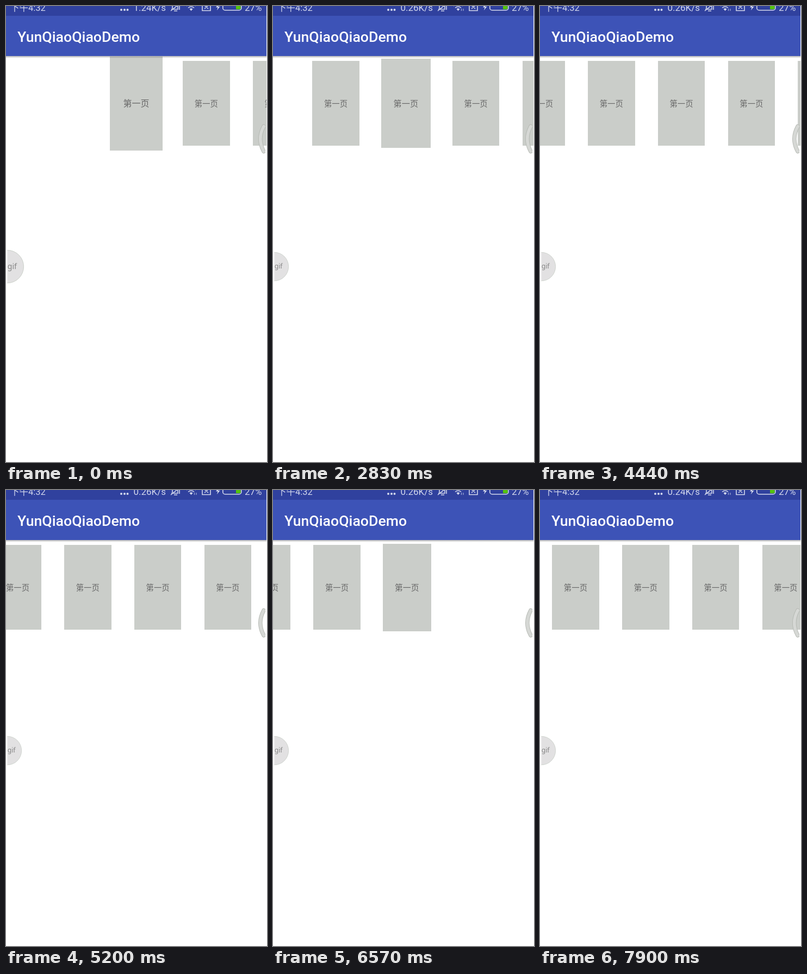
Animation of 480 by 839 pixels, one loop 8000 ms. Source, as an HTML page:

```html
<!DOCTYPE html>
<html lang="zh-CN">
<head>
<meta charset="utf-8">
<title>Pager demo</title>
<style>
  html, body { margin: 0; width: 100%; height: 100%; overflow: hidden; background: #fff; }
  svg { display: block; width: 100%; height: 100%; }
  text { font-family: Roboto, "Noto Sans CJK SC", "Noto Sans CJK", sans-serif; }
  .title { font-size: 26.67px; font-weight: 500; fill: #fff; }
  .status { font-size: 17px; fill: #d3d8ec; }
  .icon { fill: none; stroke: #d3d8ec; stroke-width: 1.6; }
  .card rect { fill: #cacdc9; shape-rendering: crispEdges; }
  .card text { font-size: 16px; fill: #686868; text-anchor: middle; }
  .handle { fill: none; stroke-linecap: round; }
  .bubble-label { font-family: "Noto Sans", sans-serif; font-size: 14px; fill: #858585; }
</style>
</head>
<body>
<svg viewBox="0 0 480 839">
  <defs>
    <linearGradient id="shade" x2="0" y2="1">
      <stop stop-color="#000" stop-opacity=".3"/>
      <stop offset="1" stop-color="#000" stop-opacity="0"/>
    </linearGradient>
    <clipPath id="edge"><rect x="460" y="210" width="17" height="70"/></clipPath>
    <clipPath id="screen"><rect width="479" height="839"/></clipPath>
  </defs>

  <g clip-path="url(#screen)">
    <g id="cards"></g>

    <rect y="92" width="480" height="4" fill="url(#shade)"/>
    <rect width="480" height="92" fill="#3d53b7"/>
    <rect width="480" height="18" fill="#30419e"/>
    <text class="title" x="21" y="66">YunQiaoQiaoDemo</text>

    <g class="status">
      <text x="8" y="9" style="font-size:16.5px">下午4:32</text>
      <circle cx="212" cy="7" r="2"/><circle cx="218" cy="7" r="2"/><circle cx="223.5" cy="7" r="2"/>
      <text id="speed" x="294" y="9" text-anchor="end"></text>
      <text x="439" y="8.5">27%</text>
    </g>
    <g class="icon">
      <path d="M304 6h13M306 5V-2M316 5V-2M309 9h6M303 9L319-4M319 0v7"/>
      <path d="M332 0Q340.5-6 349 0M335 3.5Q340.5-1 346 3.5"/>
      <path d="M337.5 5.5Q340.5 3 343.5 5.5L340.5 9Z" fill="#d3d8ec" stroke="none"/>
      <path id="traffic" d="M346.5 5v4M350 5v4" stroke-width="1.2" opacity=".7"/>
      <path d="M361-3V8.5H376V-3M365-1l7 6M372-1l-7 6"/>
      <path d="M390-3L386 2.5H389.5L388 8L393.5 1H390Z" fill="#d3d8ec" stroke="none"/>
      <rect x="398.8" y="-6" width="34" height="13.7" rx="4"/>
      <rect x="423" y="-4" width="8.5" height="10" fill="#55c40c" stroke="none"/>
    </g>

    <g clip-path="url(#edge)">
      <path class="handle" d="M474 221.5Q461.5 244.5 474 267.5" stroke="#b4b8b2" stroke-width="7.5"/>
      <path class="handle" d="M474 221.5Q461.5 244.5 474 267.5" stroke="#d6d8d5" stroke-width="5.7"/>
    </g>

    <g id="bubble">
      <path d="M0-30.5A30.5 30.5 0 0 1 0 30.5Z" fill="#e2e1e2"/>
      <path d="M0-30.2A30.2 30.2 0 0 1 0 30.2" fill="none" stroke="#cdd2cb"/>
      <text class="bubble-label" x=".5" y="4">gif</text>
    </g>
  </g>
</svg>
<script>
const LOOP = 8000, PAGES = 8, CENTER = 239.45, GAP = 128.8;
const STEP_SLACK = 10;

// start, end, visible steps, page reached, share covered by first step, easing power
const SWIPES = [
  [2310, 3050, 9, 1, .28, 3],
  [3290, 3570, 4, 2, .62, 3],
  [3720, 4250, 6, 3, .35, 3],
  [4400, 4540, 3, 4, .84, 3],
  [4700, 5010, 5, 5, .45, 3],
  [5180, 5400, 4, 6, .692, 3],
  [5750, 6050, 5, 7, .45, 3],
  [6570, 7020, 6, 6, .053, 2],
  [7170, 7610, 6, 5, .2, 2],
  [7760, 7900, 3, 4.351, .3, 1],
];

const byId = id => document.getElementById(id);
byId('cards').innerHTML = `<g class="card">
  <rect x="-48.1" y="-86.5" width="96.2" height="173"/>
  <text y="6">第一页</text></g>`.repeat(PAGES);
const cards = [...document.querySelectorAll('.card')];

function scrollAt(t) {
  let page = 0;
  for (const [start, end, steps, target, first, power] of SWIPES) {
    if (t < start) break;
    const last = steps - 1;
    const interval = (end - start) / last;
    const step = Math.min(last, Math.floor((t - start + STEP_SLACK) / interval));
    const left = (1 - first) * (1 - step / last) ** power;
    page = target + (page - target) * left;
  }
  return page;
}

function render(t) {
  const page = scrollAt(t);
  cards.forEach((card, i) => {
    const offset = (i - page) * GAP;
    const scale = Math.max(.9, 1 - Math.abs(offset) * .0102);
    card.setAttribute('transform', `translate(${CENTER + offset} 179.2) scale(${scale})`);
  });
  const size = t < 100 ? 1 : t < 230 ? .935 : .87;
  byId('bubble').setAttribute('transform', `translate(2.3 479.5) scale(${size})`);
  byId('speed').textContent = (t < 2590 ? '1.24' : t < 7350 ? '0.26' : '0.24') + 'K/s';
  byId('traffic').style.visibility = t < 920 ? 'hidden' : 'visible';
}

const began = performance.now();
function tick() {
  render((performance.now() - began) % LOOP);
  requestAnimationFrame(tick);
}
tick();
</script>
</body>
</html>
```
